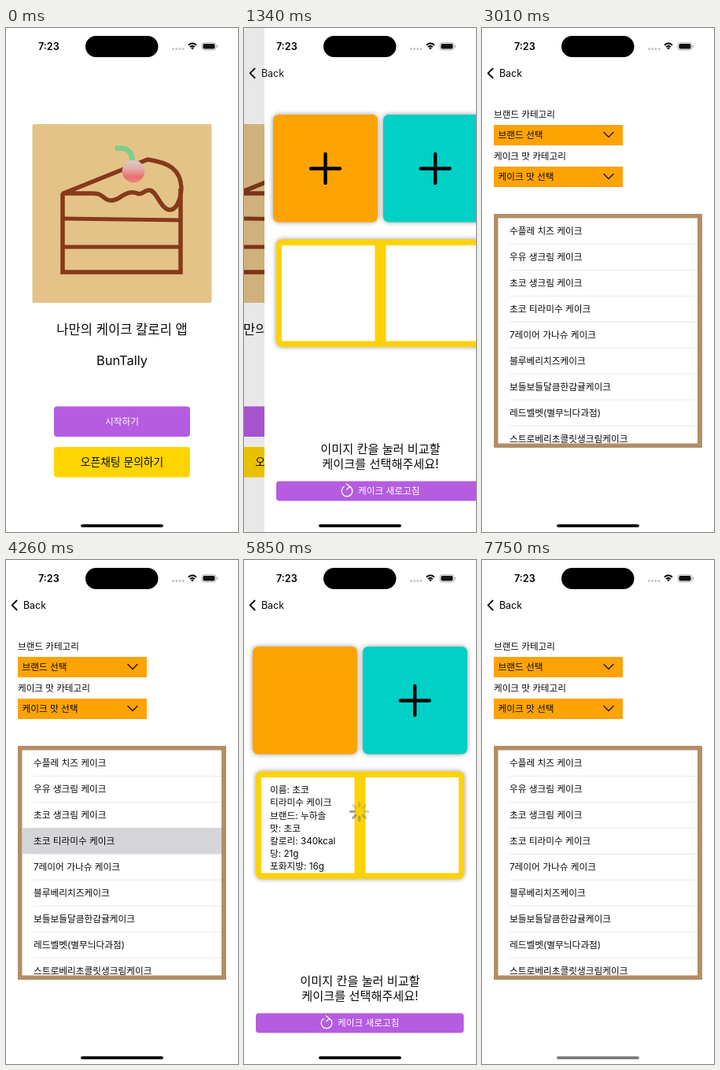
Write an HTML page with a canvas that moves like this. It is 295 px wide and 640 px high and loops after 8 s.

```html
<!DOCTYPE html>
<html lang="ko">
<head>
<meta charset="utf-8">
<title>Cake calorie app</title>
<style>
  html, body { margin: 0; width: 100%; height: 100%; overflow: hidden; background: #fff; }
  canvas { display: block; width: 295px; height: 640px; }
</style>
</head>
<body>
<canvas id="stage"></canvas>
<script>
const W = 295, H = 640, LOOP = 8000;
const FONT = 'Inter, "Noto Sans CJK KR", "Noto Sans CJK", sans-serif';
const INK = '#0a0a0a', ORANGE = '#ffa303', TEAL = '#00d0c5', YELLOW = '#ffd207',
      PURPLE = '#b55ce1', BROWN = '#87391a';

const canvas = document.getElementById('stage');
const ratio = window.devicePixelRatio || 1;
canvas.width = W * ratio;
canvas.height = H * ratio;
const ctx = canvas.getContext('2d');

const clamp = v => Math.max(0, Math.min(1, v));

function box(x, y, w, h, r, color, shadow) {
  ctx.save();
  if (shadow) {
    ctx.shadowColor = 'rgba(0,0,0,.42)';
    ctx.shadowBlur = 6 * ratio;
  }
  ctx.fillStyle = color;
  ctx.beginPath();
  ctx.roundRect(x, y, w, h, r);
  ctx.fill();
  ctx.restore();
}

function poly(color, ...points) {
  ctx.fillStyle = color;
  ctx.beginPath();
  points.forEach(p => ctx.lineTo(...p));
  ctx.fill();
}

function stroke(path, color, width, cap = 'round') {
  ctx.strokeStyle = color;
  ctx.lineWidth = width;
  ctx.lineCap = cap;
  ctx.lineJoin = cap === 'round' ? 'round' : 'miter';
  ctx.stroke(new Path2D(path));
}

function disc(x, y, r, color) {
  ctx.fillStyle = color;
  ctx.beginPath();
  ctx.arc(x, y, r, 0, Math.PI * 2);
  ctx.fill();
}

// cy is the optical middle of the line
function label(str, x, cy, size, color = INK, align = 'left', weight = 400) {
  ctx.font = `${weight} ${size}px ${FONT}`;
  ctx.fillStyle = color;
  ctx.textAlign = align;
  ctx.fillText(str, x, cy + size * 0.37);
}

function drawHome() {
  box(33.5, 122, 228, 227, 2, '#e3c388');
  stroke('M72 210V310H222V204', BROWN, 5.5, 'butt');
  stroke('M72 242L222 244M72 278H222', BROWN, 5, 'butt');
  stroke('M73 210L180 167C208 171 222 180 223 203' +
         'C222 220 216 231 208 231C196 230 192 206 182 206' +
         'C174 206 174 213 167 210C160 207 154 209 148 213' +
         'C140 219 133 221 127 217C118 209 114 210 107 210H73', BROWN, 5.5);
  stroke('M139 153C153 151 160 156 161 169', '#7ad08a', 6.5, 'butt');
  const cherry = ctx.createLinearGradient(0, 168, 0, 196);
  cherry.addColorStop(0, '#dccac6');
  cherry.addColorStop(0.4, '#e3aaa8');
  cherry.addColorStop(0.75, '#e9706b');
  cherry.addColorStop(1, '#ea8580');
  disc(162, 182, 14.3, cherry);

  label('나만의 케이크 칼로리 앱', W / 2, 383, 16.6, INK, 'center');
  label('BunTally', W / 2, 422, 16.5, INK, 'center');
  box(61, 480.5, 173, 38.5, 4, PURPLE);
  label('시작하기', W / 2, 500, 11.7, '#fff', 'center');
  box(61, 532, 173, 38.5, 4, '#ffd400');
  label('오픈채팅 문의하기', W / 2, 551, 13.8, INK, 'center');
}

function drawPlus(x) {
  stroke(`M${x - 18.5} 178.5H${x + 18.5}M${x} 160V197`, '#000', 4.4);
}

function drawSlice(alpha) {
  ctx.save();
  ctx.globalAlpha = alpha;
  box(18, 117, 118.5, 122, 0, '#f2f1f2');
  // bands of the side face, from the top down: left y, right y
  const bands = [[178, 147, '#8f4b38'], [188, 161, '#c49551'],
                 [201, 173, '#f3e3ba'], [211, 186, '#c39350'], [221, 199]];
  bands.slice(0, -1).forEach(([l, r, color], i) => {
    const [l2, r2] = bands[i + 1];
    poly(color, [31, l], [124, r], [124, r2], [32, l2]);
  });
  ctx.fillStyle = '#70382a';
  ctx.fill(new Path2D('M31 179L74 126Q77 123 84 125Q108 128 123 137Q126 141 124 149Z'));
  ctx.restore();
}

function drawSpinner(step, alpha) {
  ctx.save();
  ctx.translate(146.7, 319.5);
  for (let i = 0; i < 8; i++) {
    const age = (((step - i) % 8) + 8) % 8;
    ctx.globalAlpha = alpha * Math.max(0.22, 0.6 - age * 0.075);
    stroke('M0 -6.7V-11', '#6b6b70', 3.5);
    ctx.rotate(Math.PI / 4);
  }
  ctx.restore();
}

function drawCompare(t) {
  const chosen = t >= 4100;
  box(11, 110, 133, 136.5, 7, ORANGE, true);
  box(151, 110, 133, 136.5, 7, TEAL, true);
  if (!chosen) drawPlus(77.5);
  drawPlus(217.2);

  box(15, 268.5, 265, 136.5, 7, YELLOW, true);
  box(22, 276, 118.5, 121.5, 0, '#fff');
  box(154.5, 276, 118.5, 121.5, 0, '#fff');

  if (chosen) {
    ['이름: 초코', '티라미수 케이크', '브랜드: 누하솔', '맛: 초코',
     '칼로리: 340kcal', '당: 21g', '포화지방: 16g']
      .forEach((line, i) => label(line, 33, 292 + i * 16.1, 11.7));
    const loaded = t < 6150 ? 0 : clamp((Math.floor((t - 6150) / 115) + 1) / 4);
    if (loaded) drawSlice(loaded);
    if (t < 6400) drawSpinner(2 + Math.floor((Math.max(t, 4700) - 4650) / 100), 1);
  }

  label('이미지 칸을 눌러 비교할', W / 2, 534, 15.2, INK, 'center');
  label('케이크를 선택해주세요!', W / 2, 553.5, 15.2, INK, 'center');
  box(15, 575.5, 264.5, 25, 4, PURPLE);
  stroke('M108.5 582.2A6.8 6.8 0 1 1 101 582.5M104.2 579L108.8 582.2L104.8 585.8', '#fff', 1.4);
  label('케이크 새로고침', 119, 588, 11.7, '#fff');
}

const CAKES = ['수플레 치즈 케이크', '우유 생크림 케이크', '초코 생크림 케이크',
  '초코 티라미수 케이크', '7레이어 가나슈 케이크', '블루베리치즈케이크',
  '보들보들달큼한감귤케이크', '레드벨벳(별무늬다과점)', '스트로베리초콜릿생크림케이크'];

function drawPicker(title, hint, cy) {
  label(title, 15, cy, 11.6);
  box(15, cy + 13, 164, 26, 0, ORANGE);
  label(hint, 20.5, cy + 26, 11.7);
  stroke(`M155 ${cy + 22.5}L161 ${cy + 28.5}L167 ${cy + 22.5}`, '#201400', 1.4);
}

function drawList(t) {
  drawPicker('브랜드 카테고리', '브랜드 선택', 110);
  drawPicker('케이크 맛 카테고리', '케이크 맛 선택', 163);

  box(15, 236, 265, 297, 0, '#b18e66');
  box(20.5, 241.5, 253.5, 286, 0, '#fff');
  ctx.save();
  ctx.beginPath();
  ctx.rect(20.5, 241.5, 253.5, 286);
  ctx.clip();
  const pressed = t >= 4100 && t < 4700 ? 3 : -1;
  CAKES.forEach((name, i) => {
    const cy = 258 + i * 32.95;
    if (i === pressed) box(20.5, cy - 16.5, 253.5, 33, 0, '#d5d5d9');
    label(name, 35, cy, 11.7);
    box(35, cy + 16, 239, 0.8, 0, '#e4e4e6');
  });
  ctx.restore();
}

function drawStatus(t) {
  label('7:23', 54.3, 23.5, 12.6, '#000', 'center', 600);
  box(101, 10, 92.5, 27, 13.5, '#000');
  for (let i = 0; i < 4; i++) disc(212.5 + i * 4.2, 26.5, 1.5, '#c4c4c6');

  stroke('M232 21.7Q237 17.3 242 21.7M234 24.1Q237 21.5 240 24.1', '#000', 1.9, 'butt');
  poly('#000', [235.1, 25.3], [237, 24.3], [238.9, 25.3], [237, 27.4]);

  ctx.strokeStyle = '#a6a6a8';
  ctx.lineWidth = 0.9;
  ctx.beginPath();
  ctx.roundRect(249, 18.7, 18, 9.2, 3);
  ctx.stroke();
  box(250.4, 20.1, 15.2, 6.4, 1.8, '#111');
  box(268.2, 21.8, 1.1, 3, 0.6, '#a6a6a8');

  box(95, 630.3, 105, 3.6, 1.8, t >= 7020 ? '#7c7c7c' : '#000');
}

function drawBack(alpha) {
  ctx.save();
  ctx.globalAlpha = alpha;
  stroke('M13.6 51.6L7.7 57.4L13.6 63.2', '#000', 2);
  label('Back', 22, 57.5, 12.4, '#000');
  ctx.restore();
}

const MOVES = [
  { start: 1000, step: 115, end: 1720, under: drawHome, over: drawCompare },
  { start: 2310, step: 102, end: 3010, under: drawCompare, over: drawList },
  { start: 4260, step: 110, end: 4700, under: drawCompare, over: drawList, pop: true },
  { start: 7020, step: 115, end: 7750, under: drawCompare, over: drawList }
];

function travel(t, move) {
  if (t >= move.end) return 1;
  const n = Math.min(4, Math.floor((t - move.start) / move.step));
  const s = n * move.step * 0.0175;
  return 1 - (1 + s) * Math.exp(-s);
}

function page(draw, x, t) {
  ctx.save();
  ctx.translate(x, 0);
  box(0, 0, W, H, 0, '#fff');
  draw(t);
  ctx.restore();
}

function render(t) {
  ctx.setTransform(ratio, 0, 0, ratio, 0, 0);
  const move = MOVES.filter(m => t >= m.start).pop();
  if (!move) {
    page(drawHome, 0, t);
  } else {
    const p = travel(t, move);
    const cover = move.pop ? 1 - p : p;
    if (cover < 1) {
      page(move.under, -0.3 * W * cover, t);
      box(0, 0, W, H, 0, `rgba(0,0,0,${0.1 * cover})`);
    }
    if (cover > 0) page(move.over, Math.round(W * (1 - cover)), t);
    drawBack(move.under === drawHome ? p : 1);
  }
  drawStatus(t);
}

function tick() {
  render(performance.now() % LOOP);
  requestAnimationFrame(tick);
}
tick();
</script>
</body>
</html>
```
